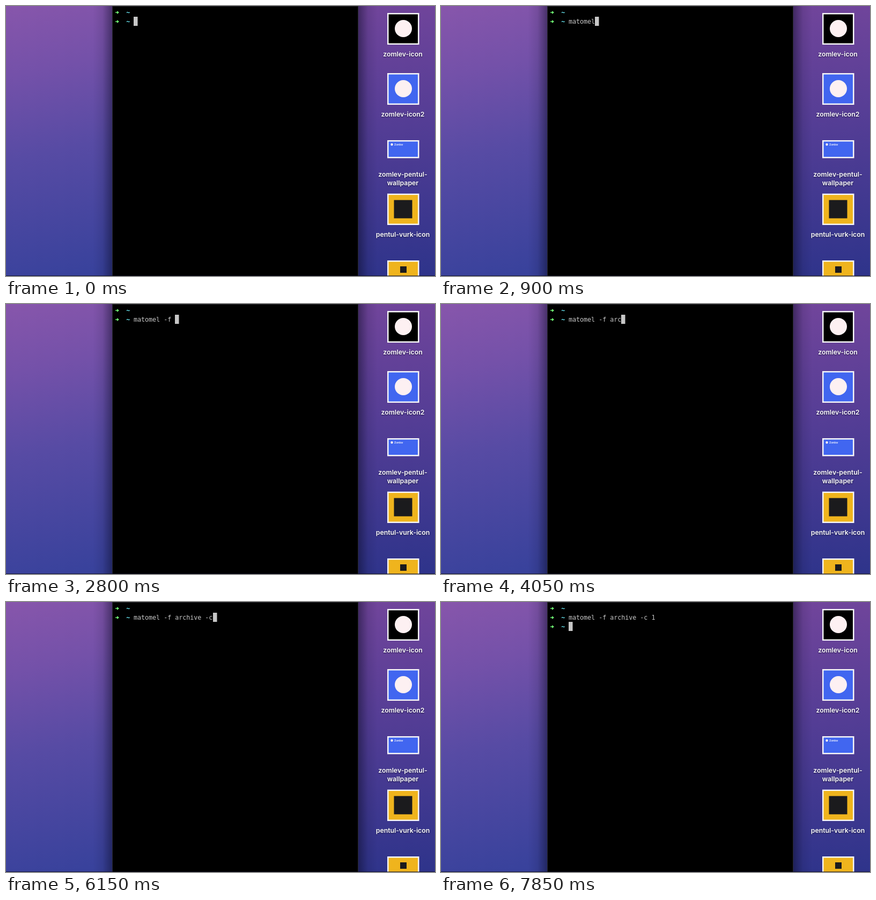
Write an HTML page that moves like this. It is 800 px wide and 503 px high and loops after 8000 ms.

```html
<!DOCTYPE html>
<html lang="en">
<head>
<meta charset="utf-8">
<title>Terminal typing</title>
<style>
  html, body { margin: 0; width: 100%; height: 100%; overflow: hidden; background: #000; }
  svg { display: block; width: 100vw; height: 100vh; }
  .mono { font: 11.67px "DejaVu Sans Mono", "Liberation Mono", monospace; fill: #c7c7c7; white-space: pre; }
  .tilde { font-weight: bold; fill: #68e6f2; }
  .label { font: 600 12.3px Inter, "Open Sans", sans-serif; fill: #fff; text-anchor: middle;
           filter: drop-shadow(0 1px 1.2px rgba(0, 0, 20, .65)); }
  .tiny { font: 600 4.6px Inter, sans-serif; fill: #fff; }
</style>
</head>
<body>
<svg viewBox="0 0 800 503" preserveAspectRatio="none">
  <defs>
    <linearGradient id="sky" gradientUnits="userSpaceOnUse" x1="0" y1="0" x2="110" y2="503">
      <stop offset="0" stop-color="#8756ab"/>
      <stop offset=".25" stop-color="#7451a9"/>
      <stop offset=".55" stop-color="#574ba4"/>
      <stop offset="1" stop-color="#39429c"/>
    </linearGradient>
    <linearGradient id="dusk" gradientUnits="userSpaceOnUse" x1="657" y1="0" x2="700" y2="503">
      <stop offset="0" stop-color="#71459b"/>
      <stop offset=".4" stop-color="#573e96"/>
      <stop offset="1" stop-color="#2f348b"/>
    </linearGradient>
    <linearGradient id="shade">
      <stop offset="0" stop-color="#06061c" stop-opacity="0"/>
      <stop offset=".5" stop-color="#06061c" stop-opacity=".1"/>
      <stop offset="1" stop-color="#06061c" stop-opacity=".45"/>
    </linearGradient>
  </defs>

  <rect width="400" height="503" fill="url(#sky)"/>
  <rect x="400" width="400" height="503" fill="url(#dusk)"/>
  <rect x="162" width="36" height="503" fill="url(#shade)"/>
  <rect width="36" height="503" fill="url(#shade)" transform="matrix(-1 0 0 1 693 0)"/>

  <rect x="198" width="459" height="503" fill="#28282e"/>
  <rect x="199" y="1" width="457" height="502" fill="#000"/>

  <g id="prompts"></g>
  <text id="command" class="mono" x="238" y="33"></text>
  <rect id="cursor" width="7.5" height="17" fill="#c7c7c7"/>

  <g id="icons"></g>
  <rect y="502" width="800" height="1" fill="#0a0a20" opacity=".75"/>
</svg>
<script>
const LOOP = 8000;
const COL = 7.025;
const LEFT = 238;
const ENTER = 7850;
const COMMAND = "matomel -f archive -c 1";
// Time of each key press in ms
const KEYS = [50, 300, 550, 650, 700, 800, 900, 1100, 1750, 1900, 2250,
  3800, 3850, 4050, 4350, 4500, 4550, 4750, 4900, 5750, 6150, 6850, 7100];

const el = id => document.getElementById(id);

function prompt(y) {
  return `<g transform="translate(0 ${y})">
    <path d="M204 -.8h3v-2.2l4 3l-4 3v-2.2h-3z" fill="#6df272"/>
    <text class="mono tilde" x="224.2" y="4">~</text></g>`;
}

function thumb(y, h, fill, art) {
  return `<rect x="711" y="${y}" width="59.5" height="${h}" fill="#f6f6f8"/>
    <rect x="713.5" y="${y + 2.5}" width="54.5" height="${h - 5}" fill="${fill}"/>${art}`;
}

const disc = (x, y, r) => `<circle cx="${x}" cy="${y}" r="${r}" fill="#fdf0f2"/>`;
const square = (x, y, size) => `<rect x="${x}" y="${y}" width="${size}" height="${size}" fill="#1b1b1d"/>`;
const label = (y, text) => `<text class="label" x="740" y="${y}">${text}</text>`;

el("prompts").innerHTML = prompt(12) + prompt(29) + `<g id="next">${prompt(46)}</g>`;

el("icons").innerHTML =
  thumb(13, 59, "#000", disc(741, 42, 16)) + label(94, "zomlev-icon") +
  thumb(125, 59, "#4166f0", disc(741, 154, 16)) + label(206, "zomlev-icon2") +
  thumb(250, 33.5, "#4166f0", disc(719.5, 258, 2.2) + '<text class="tiny" x="724" y="259.8">Zomlev</text>') +
  label(318, "zomlev-pentul-") + label(334, "wallpaper") +
  thumb(349.5, 58.5, "#efb41d", square(723.5, 361.5, 34)) + label(430, "pentul-vurk-icon") +
  thumb(474, 40, "#efb41d", square(735, 485, 12));

function draw(t) {
  const typed = KEYS.filter(k => k <= t).length;
  const done = t >= ENTER;
  el("command").textContent = COMMAND.slice(0, typed);
  el("next").setAttribute("visibility", done ? "visible" : "hidden");
  el("cursor").setAttribute("x", Math.round(LEFT + (done ? 0 : typed * COL)));
  el("cursor").setAttribute("y", done ? 37 : 20);
}

const start = performance.now();
function tick() {
  draw((performance.now() - start) % LOOP);
  requestAnimationFrame(tick);
}
tick();
</script>
</body>
</html>
```
